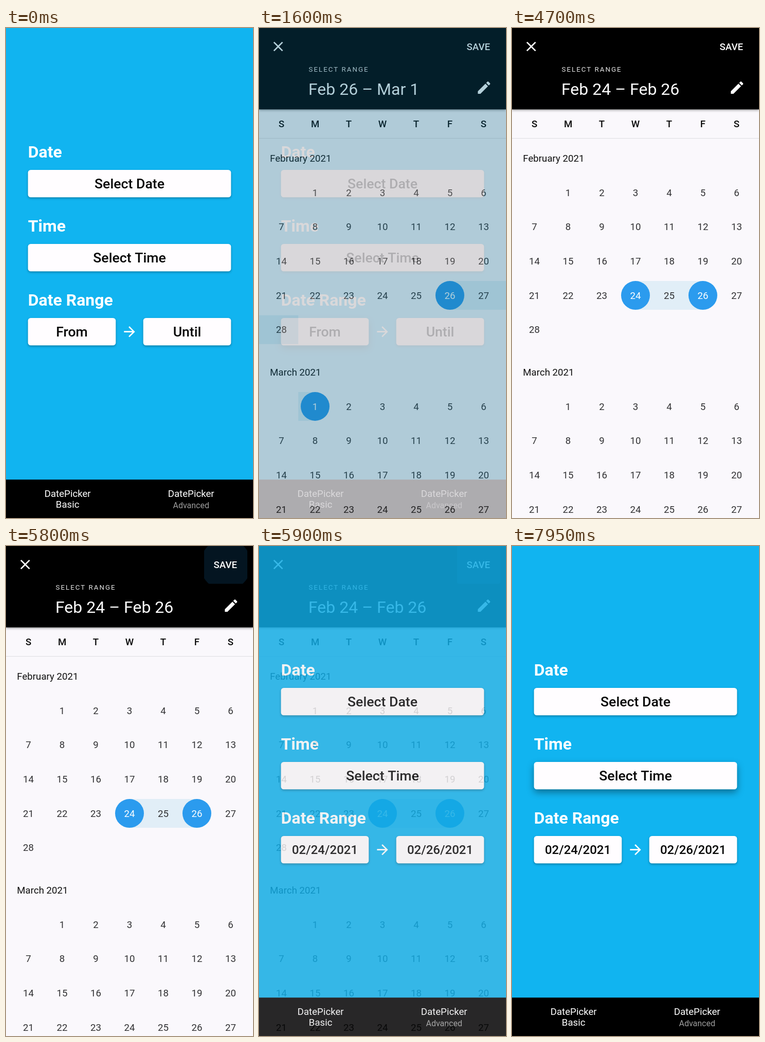
Recreate the animation shown at these times as an HTML page with a canvas. Size 480 by 953 pixels, loop 8 s.

```html
<!DOCTYPE html>
<html lang="en">
<head>
<meta charset="utf-8">
<title>Date picker</title>
<style>
html, body { margin: 0; width: 100%; height: 100%; overflow: hidden; background: #11b4f0; }
canvas { display: block; width: 100vw; height: 100vh; }
</style>
</head>
<body>
<canvas id="stage" width="480" height="953"></canvas>
<script>
const W = 480, H = 953, LOOP = 8000;
const OPEN = 1550, PICK_START = 2850, PICK_END = 4300, RIPPLE = 5650, CLOSE = 5800, PRESS_TIME = 7950;
const OPEN_MS = 100, CLOSE_MS = 112;
const BLUE = '#2b9bee', RANGE = '#e1eef7', INK = '#313133';

const stage = document.getElementById('stage').getContext('2d');
const layerCanvas = document.createElement('canvas');
layerCanvas.width = W;
layerCanvas.height = H;
const layer = layerCanvas.getContext('2d');

const icons = {
  arrow: new Path2D('M12 4l-1.41 1.41L16.17 11H4v2h12.17l-5.58 5.59L12 20l8-8z'),
  close: new Path2D('M19 6.41L17.59 5 12 10.59 6.41 5 5 6.41 10.59 12 5 17.59 6.41 19 12 13.41 17.59 19 19 17.59 13.41 12z'),
  edit: new Path2D('M3 17.25V21h3.75L17.81 9.94l-3.75-3.75L3 17.25zM20.71 7.04c.39-.39.39-1.02 0-1.41l-2.34-2.34c-.39-.39-1.02-.39-1.41 0l-1.83 1.83 3.75 3.75 1.83-1.83z')
};

const clamp = v => Math.min(1, Math.max(0, v));

// Cubic Bezier easing, solved by bisection
function bezier(x1, y1, x2, y2) {
  const at = (a, b, s) => 3 * a * s * (1 - s) ** 2 + 3 * b * s * s * (1 - s) + s ** 3;
  return t => {
    if (t <= 0 || t >= 1) return clamp(t);
    let lo = 0, hi = 1;
    for (let i = 0; i < 20; i++) {
      const mid = (lo + hi) / 2;
      if (at(x1, x2, mid) < t) lo = mid; else hi = mid;
    }
    return at(y1, y2, lo);
  };
}
const easeOut = bezier(0, 0, 0.58, 1);
const ease = bezier(0.25, 0.1, 0.25, 1);

function text(c, str, x, y, size, { weight = 400, color = '#fff', align = 'left', spacing = 0 } = {}) {
  c.font = `${weight} ${size}px Roboto, sans-serif`;
  c.letterSpacing = spacing + 'px';
  c.textAlign = align;
  c.fillStyle = color;
  c.fillText(str, x, y);
  return c.measureText(str).width;
}

function rect(c, x, y, w, h, color) {
  c.fillStyle = color;
  c.fillRect(x, y, w, h);
}

function disc(c, x, y, r, color) {
  c.fillStyle = color;
  c.beginPath();
  c.arc(x, y, r, 0, Math.PI * 2);
  c.fill();
}

function icon(c, name, cx, cy) {
  c.save();
  c.translate(cx - 16, cy - 16);
  c.scale(4 / 3, 4 / 3);
  c.fillStyle = '#fff';
  c.fill(icons[name]);
  c.restore();
}

function button(c, label, x, y, w, size, raised) {
  c.save();
  c.shadowColor = raised ? 'rgba(0,0,0,.38)' : 'rgba(0,0,0,.3)';
  c.shadowBlur = raised ? 14 : 4;
  c.shadowOffsetY = raised ? 6 : 2;
  c.fillStyle = '#fffdff';
  c.beginPath();
  c.roundRect(x, y, w, 53.3, 5.3);
  c.fill();
  c.restore();
  text(c, label, x + w / 2, y + 26.9 + size * 0.355, size, { weight: 500, color: '#060606', align: 'center' });
}

function drawHome(c, t) {
  rect(c, 0, 0, W, H, '#11b4f0');
  ['Date', 'Time', 'Date Range'].forEach((s, i) => text(c, s, 42.7, 252 + 144 * i, 32, { weight: 700 }));
  button(c, 'Select Date', 42.7, 276, 394.6, 26.67, false);
  button(c, 'Select Time', 42.7, 420, 394.6, 26.67, t >= PRESS_TIME);
  const done = t >= CLOSE, size = done ? 24 : 26.67;
  button(c, done ? '02/24/2021' : 'From', 42.7, 564, 170.6, size, t >= OPEN && !done);
  button(c, done ? '02/26/2021' : 'Until', 266.7, 564, 170.6, size, false);
  icon(c, 'arrow', 240, 590.7);

  rect(c, 0, 878.3, W, H - 878.3, '#000');
  const mid = { align: 'center' };
  text(c, 'DatePicker', 119.7, 912, 18.67, mid);
  text(c, 'Basic', 119.7, 933.3, 18.67, mid);
  text(c, 'DatePicker', 359.7, 912, 18.67, mid);
  text(c, 'Advanced', 359.7, 934, 16, { align: 'center', color: '#9d9d9d' });
}

const colX = i => 240 + 65.47 * (i - 3);
const MONTHS = [
  { name: 'February 2021', titleY: 260, top: 320, days: 28 },
  { name: 'March 2021', titleY: 676, top: 736, days: 27 }
];

// Both months start on a Monday
function dayPos(month, day) {
  return { x: colX(day % 7), y: MONTHS[month].top + Math.floor(day / 7) * 66.67 };
}

function bar(c, x0, x1, y) {
  rect(c, x0, y - 28, x1 - x0, 56, RANGE);
}

function drawMonths(c, t) {
  const selected = t < PICK_START ? ['0-26', '1-1'] : t < PICK_END ? ['0-24'] : ['0-24', '0-26'];
  const start = dayPos(0, 24), today = dayPos(0, 26);
  if (t < PICK_START) {
    const half = 65.47 / 2, next = dayPos(0, 28), end = dayPos(1, 1);
    bar(c, today.x, W, today.y);
    bar(c, 0, next.x + half, next.y);
    bar(c, end.x - half, end.x, end.y);
  } else if (t >= PICK_END) {
    bar(c, start.x, today.x, start.y);
  }

  MONTHS.forEach((m, mi) => {
    text(c, m.name, 21.3, m.titleY, 18.67, { color: '#111' });
    for (let d = 1; d <= m.days; d++) {
      const { x, y } = dayPos(mi, d);
      let color = INK;
      if (selected.includes(mi + '-' + d)) {
        disc(c, x, y, 28, BLUE);
        color = '#fff';
      } else if (mi === 0 && d === 26) {
        c.strokeStyle = color = '#359fe2';
        c.lineWidth = 1.33;
        c.beginPath();
        c.arc(x, y, 27.4, 0, Math.PI * 2);
        c.stroke();
      }
      text(c, d, x, y + 6.7, 18.67, { color, align: 'center' });
    }
  });
}

function drawHeader(c, t) {
  c.save();
  c.shadowColor = 'rgba(0,0,0,.45)';
  c.shadowBlur = 5;
  c.shadowOffsetY = 2;
  rect(c, 0, 0, W, 158.3, '#000');
  c.restore();

  if (t >= RIPPLE) {
    c.save();
    c.beginPath();
    c.roundRect(385, -1, 84, 74.5, 4);
    c.clip();
    disc(c, 427, 36, 6 + (t - RIPPLE) * 0.29, '#041521');
    c.restore();
  }

  const open = t >= PICK_START && t < PICK_END;
  const dim = '#606063';
  icon(c, 'close', 37.3, 36);
  icon(c, 'edit', 437.3, 116);
  text(c, 'SAVE', 426.3, 42.6, 18.67, { weight: 500, align: 'center', color: open ? dim : '#fff' });
  text(c, 'SELECT RANGE', 96.5, 85.3, 13.33, { spacing: 2, color: '#e4e4e4' });

  const from = t < PICK_START ? 'Feb 26' : 'Feb 24';
  const until = t < PICK_START ? 'Mar 1' : open ? 'End Date' : 'Feb 26';
  let x = 96;
  x += text(c, from, x, 129.5, 32);
  x += text(c, ' – ', x, 129.5, 32);
  text(c, until, x, 129.5, 32, { color: open ? dim : '#fff' });
}

function drawPicker(c, t) {
  rect(c, 0, 0, W, H, '#faf8fc');
  drawMonths(c, t);
  [...'SMTWTFS'].forEach((s, i) =>
    text(c, s, colX(i), 193.4, 18.67, { weight: 500, color: '#080808', align: 'center' }));
  rect(c, 0, 214, W, 1.2, '#e2e0e4');
  drawHeader(c, t);
}

function draw(t) {
  const shown = t < CLOSE ? clamp((t - OPEN) / OPEN_MS) : 1 - clamp((t - CLOSE) / CLOSE_MS);
  if (shown < 1) drawHome(stage, t);
  if (shown <= 0) return;
  rect(stage, 0, 0, W, H, `rgba(0,0,0,${0.54 * ease(shown)})`);
  drawPicker(layer, t);
  stage.globalAlpha = easeOut(shown);
  stage.drawImage(layerCanvas, 0, 0);
  stage.globalAlpha = 1;
}

const began = performance.now();
function tick() {
  draw((performance.now() - began) % LOOP);
  requestAnimationFrame(tick);
}
tick();
</script>
</body>
</html>
```
